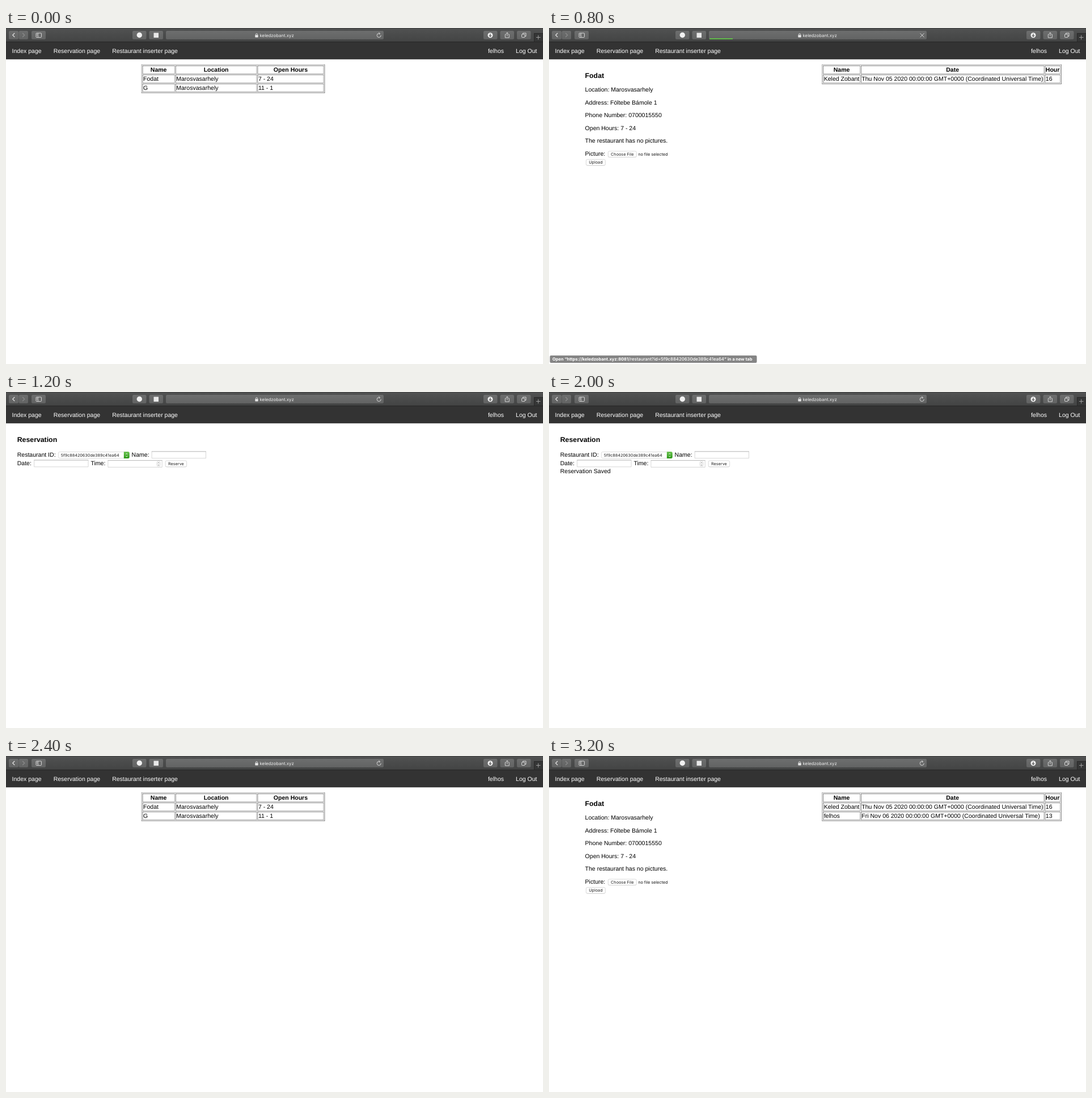
Animation, 947 px wide and 592 px high, one loop 3600 ms. Source, as an HTML page with a canvas:

```html
<!DOCTYPE html>
<html lang="en">
<head>
<meta charset="utf-8">
<title>Restaurant reservation</title>
<style>
html, body { margin: 0; width: 100%; height: 100%; overflow: hidden; background: #fff; }
canvas { display: block; width: 947px; height: 592px; }
</style>
</head>
<body>
<canvas id="stage" width="947" height="592"></canvas>
<script>
const ctx = document.getElementById('stage').getContext('2d', { alpha: false });
const SCALE = 947 / 1440; // page units are those of a 1440 px wide window
const STEP = 400;
const PAGE = '"Liberation Sans", Arial, sans-serif';
const UI = 'Inter, Roboto, sans-serif';
const USER = 'felhos';
const PLACE = 'Fodat';
const HOST = 'keledzobant.xyz';
const ID = '5f9c88420630de389c41ea64';
const GUESTS = [
  ['Keled Zobant', 'Thu Nov 05 2020 00:00:00 GMT+0000 (Coordinated Universal Time)', '16'],
  [USER, 'Fri Nov 06 2020 00:00:00 GMT+0000 (Coordinated Universal Time)', '13']
];

function text(str, x, y, { size = 16, weight = 400, font = PAGE, color = '#000', align = 'left' } = {}) {
  ctx.font = `${weight} ${size}px ${font}`;
  ctx.fillStyle = color;
  ctx.textAlign = align;
  ctx.fillText(str, x, y);
  return ctx.measureText(str).width;
}

function rect(x, y, w, h, color) {
  ctx.fillStyle = color;
  ctx.fillRect(x, y, w, h);
}

function box(x, y, w, h, r, fill, stroke, line = 1) {
  ctx.beginPath();
  ctx.roundRect(x, y, w, h, r);
  if (fill) { ctx.fillStyle = fill; ctx.fill(); }
  if (stroke) { ctx.strokeStyle = stroke; ctx.lineWidth = line; ctx.stroke(); }
}

function path(points, color, width = 1) {
  ctx.beginPath();
  points.forEach(([x, y], i) => i ? ctx.lineTo(x, y) : ctx.moveTo(x, y));
  ctx.strokeStyle = color;
  ctx.lineWidth = width;
  ctx.stroke();
}

function disc(x, y, r, color) {
  ctx.beginPath();
  ctx.arc(x, y, r, 0, 7);
  ctx.fillStyle = color;
  ctx.fill();
}

function shade(y0, y1, top, bottom) {
  const g = ctx.createLinearGradient(0, y0, 0, y1);
  g.addColorStop(0, top);
  g.addColorStop(1, bottom);
  return g;
}

// Browser toolbar, in stage pixels
function toolbar(loading) {
  const ink = '#e2e2e2';
  rect(0, 0, 947, 25, shade(0, 24, '#515252', '#434444'));
  rect(0, 0, 947, 1, '#3d3e3e');
  rect(0, 24, 947, 1, '#262626');

  const face = shade(5, 20, '#6d6e6e', '#626363');
  for (const [x, w] of [[5, 17], [22.5, 16.5], [45, 25], [223, 24.5], [252.5, 24.5],
    [842, 24.5], [871.5, 24.5], [901, 24.5]]) box(x, 5, w, 15, 2.5, face);
  box(282, 5, 384, 15, 2.5, face);

  path([[15.2, 9], [11.7, 12.5], [15.2, 16]], ink, 1.2);
  path([[29.2, 9], [32.7, 12.5], [29.2, 16]], '#8b8b8b', 1.2);
  box(53, 9, 9.5, 7.5, 1, null, ink, 0.9);
  path([[56.3, 9], [56.3, 16.5]], ink, 0.9);
  path([[54, 11.2], [55.5, 11.2]], ink, 0.7);
  path([[54, 13], [55.5, 13]], ink, 0.7);
  disc(235.3, 12.5, 4.7, '#f0f0f0');
  rect(260.5, 8.5, 8.5, 8.5, '#e8e8e8');

  disc(854, 12.7, 4.5, '#f0f0f0');
  path([[854, 10], [854, 15]], '#555', 1.2);
  path([[852, 13], [854, 15.1], [856, 13]], '#555', 1.1);
  path([[882, 11.3], [880.3, 11.3], [880.3, 17], [887.3, 17], [887.3, 11.3], [885.6, 11.3]], ink, 0.9);
  path([[883.8, 14.2], [883.8, 8]], ink, 0.9);
  path([[881.9, 9.8], [883.8, 7.9], [885.7, 9.8]], ink, 0.9);
  box(909.5, 11, 5.5, 5.5, 0.8, null, ink, 0.9);
  path([[911.5, 11], [911.5, 9], [917, 9], [917, 14.5], [915, 14.5]], ink, 0.9);

  rect(931, 9, 16, 15, '#353636');
  path([[931.5, 24], [931.5, 9.5], [947, 9.5]], '#282828');
  path([[935, 16.5], [942.5, 16.5]], '#a0a0a0');
  path([[938.7, 12.7], [938.7, 20.3]], '#a0a0a0');

  box(439.3, 12.2, 5.4, 4.2, 0.6, '#e6e6e6');
  ctx.beginPath();
  ctx.arc(442, 11.6, 1.7, Math.PI, 0);
  ctx.lineTo(443.7, 12.5);
  ctx.moveTo(440.3, 11.6);
  ctx.lineTo(440.3, 12.5);
  ctx.strokeStyle = '#e6e6e6';
  ctx.lineWidth = 0.9;
  ctx.stroke();
  text(HOST, 447.5, 15.8, { size: 7.8, font: UI, color: '#f0f0f0' });

  if (loading) {
    path([[654.5, 9.3], [661.5, 16.3]], ink, 0.9);
    path([[661.5, 9.3], [654.5, 16.3]], ink, 0.9);
    rect(283, 18.3, 41, 1.5, '#62d744');
  } else {
    ctx.beginPath();
    ctx.arc(657.7, 13, 3.5, -0.1, 5.2);
    ctx.strokeStyle = ink;
    ctx.lineWidth = 0.9;
    ctx.stroke();
    path([[657.3, 8.2], [659.6, 9.9], [657.5, 11.7]], ink, 0.9);
  }
}

function nav() {
  const white = { color: '#fff' };
  rect(0, 38, 1440, 46, '#333');
  let x = 16;
  for (const item of ['Index page', 'Reservation page', 'Restaurant inserter page'])
    x += text(item, x, 66.5, white) + 32;
  const right = { color: '#fff', align: 'right' };
  const w = text('Log Out', 1424, 66.5, right);
  text(USER, 1424 - w - 32, 66.5, right);
}

function bevel(x, y, w, h, topLeft, bottomRight) {
  rect(x, y, w, 1, topLeft);
  rect(x, y, 1, h, topLeft);
  rect(x, y + h - 1, w, 1, bottomRight);
  rect(x + w - 1, y, 1, h, bottomRight);
}

function table(x, widths, rows) {
  const light = '#808080', dark = '#454545', top = 98;
  const total = widths.reduce((a, b) => a + b + 2, 4);
  bevel(x, top, total, rows.length * 24 + 4, light, dark);
  rows.forEach((row, r) => {
    let cx = x + 3;
    const cy = top + 3 + r * 24;
    row.forEach((str, c) => {
      bevel(cx, cy, widths[c], 22, dark, light);
      if (r) text(str, cx + 2, cy + 16.5);
      else text(str, cx + widths[c] / 2, cy + 16.5, { weight: 700, align: 'center' });
      cx += widths[c] + 2;
    });
  });
}

function heading(str, x) {
  text(str, x, 134.4, { size: 18.72, weight: 700 });
}

function button(str, x, y, w, h) {
  box(x, y + 0.7, w, h, 3.5, '#d0d0d0');
  box(x, y, w, h, 3.5, '#fff', '#c4c4c4', 0.9);
  text(str, x + w / 2, y + h / 2 + 4, { size: 11, font: UI, color: '#222', align: 'center' });
}

function field(x, y, value, focused) {
  if (focused) box(x - 1, y - 1, 148, 21, 2, null, '#8db8ea', 4);
  box(x + 0.5, y + 0.5, 145, 18, 0, '#fff', '#c3c3c3');
  rect(x, y, 146, 1, '#adadad');
  if (value) text(value, x + 4, y + 13.5, { size: 11, font: UI });
}

function details(x) {
  heading(PLACE, x);
  ['Location: Marosvasarhely', 'Address: Föltebe Bámole 1', 'Phone Number: 0700015550', 'Open Hours: 7 - 24']
    .forEach((line, i) => text(line, x, 171 + i * 34));
}

function indexPage(x) {
  table(x, [86.5, 218, 177.5], [
    ['Name', 'Location', 'Open Hours'],
    [PLACE, 'Marosvasarhely', '7 - 24'],
    ['G', 'Marosvasarhely', '11 - 1']
  ]);
}

function indexWithDetails() {
  const x = 948.5, purple = '#6c1d92';
  indexPage(315);
  details(x);
  const w = text('More info', x, 307, { color: purple });
  rect(x, 308.6, w, 1.1, purple);
}

function restaurantPage(guests) {
  const x = 96.7;
  details(x);
  text('The restaurant has no pictures.', x, 307);
  text('Picture:', x, 342.3);
  button('Choose File', 158.5, 330, 76, 16);
  text('no file selected', 239, 342.2, { size: 11, font: UI, color: '#111' });
  button('Upload', 99.5, 352, 51.5, 16);
  table(732, [99.3, 491.5, 41.3], [['Name', 'Date', 'Hour'], ...GUESTS.slice(0, guests)]);
}

function reservationPage({ filled, saved }) {
  heading('Reservation', 30);
  text('Restaurant ID:', 30, 173.3);
  box(140.5, 160.5, 190, 17, 3.5, '#fff', '#c4c4c4', 0.9);
  text(ID, 147, 173, { size: 11, font: UI, color: '#222' });
  box(316, 160, 15, 18, [0, 3.5, 3.5, 0], shade(160, 178, '#67c24c', '#2a9716'));
  path([[321, 167.3], [323.5, 164.6], [326, 167.3]], '#fff', 1.4);
  path([[321, 171], [323.5, 173.7], [326, 171]], '#fff', 1.4);
  text('Name:', 337, 173.3);
  field(390.5, 159, filled && USER);

  text('Date:', 30, 196.6);
  field(75, 182, filled && '2020-11-06');
  text('Time:', 227.3, 196.6);
  field(273, 183, filled && '13', filled);
  box(404.5, 185.5, 9, 14, 4, '#fff', '#c4c4c4', 0.9);
  path([[407, 191], [409, 188.8], [411, 191]], '#555', 1.1);
  path([[407, 194.6], [409, 196.8], [411, 194.6]], '#555', 1.1);
  button('Reserve', 427.5, 184, 57, 16.5);
  if (saved) text('Reservation Saved', 30, 218.2);
}

// Link preview at the bottom left, in stage pixels
function status(newTab) {
  const thin = { size: 7.75, weight: 500, font: UI, color: '#fff' };
  const bold = { size: 7.5, weight: 700, font: UI, color: '#fff' };
  box(1.5, 577, newTab ? 365 : 288, 13, 2, newTab ? '#858585' : '#6d6d6d');
  let x = 6;
  x += text((newTab ? 'Open “' : '') + `https://${HOST}:8081`, x, 586.3, bold);
  x += text(`/restaurant?id=${ID}`, x, 586.3, thin);
  if (newTab) text('” in a new tab', x, 586.3, bold);
}

const scenes = [
  { page: () => indexPage(363) },
  { page: indexWithDetails },
  { page: () => restaurantPage(1), loading: true, hint: () => status(true) },
  { page: () => reservationPage({}) },
  { page: () => reservationPage({ filled: true }) },
  { page: () => reservationPage({ saved: true }) },
  { page: () => indexPage(363) },
  { page: indexWithDetails, hint: () => status(false) },
  { page: () => restaurantPage(2) }
];

function draw() {
  const scene = scenes[Math.floor(performance.now() / STEP) % scenes.length];
  ctx.setTransform(1, 0, 0, 1, 0, 0);
  ctx.textRendering = 'geometricPrecision';
  rect(0, 0, 947, 592, '#fff');
  ctx.save();
  ctx.scale(SCALE, SCALE);
  nav();
  scene.page();
  ctx.restore();
  toolbar(scene.loading);
  if (scene.hint) scene.hint();
  requestAnimationFrame(draw);
}
draw();
</script>
</body>
</html>
```
